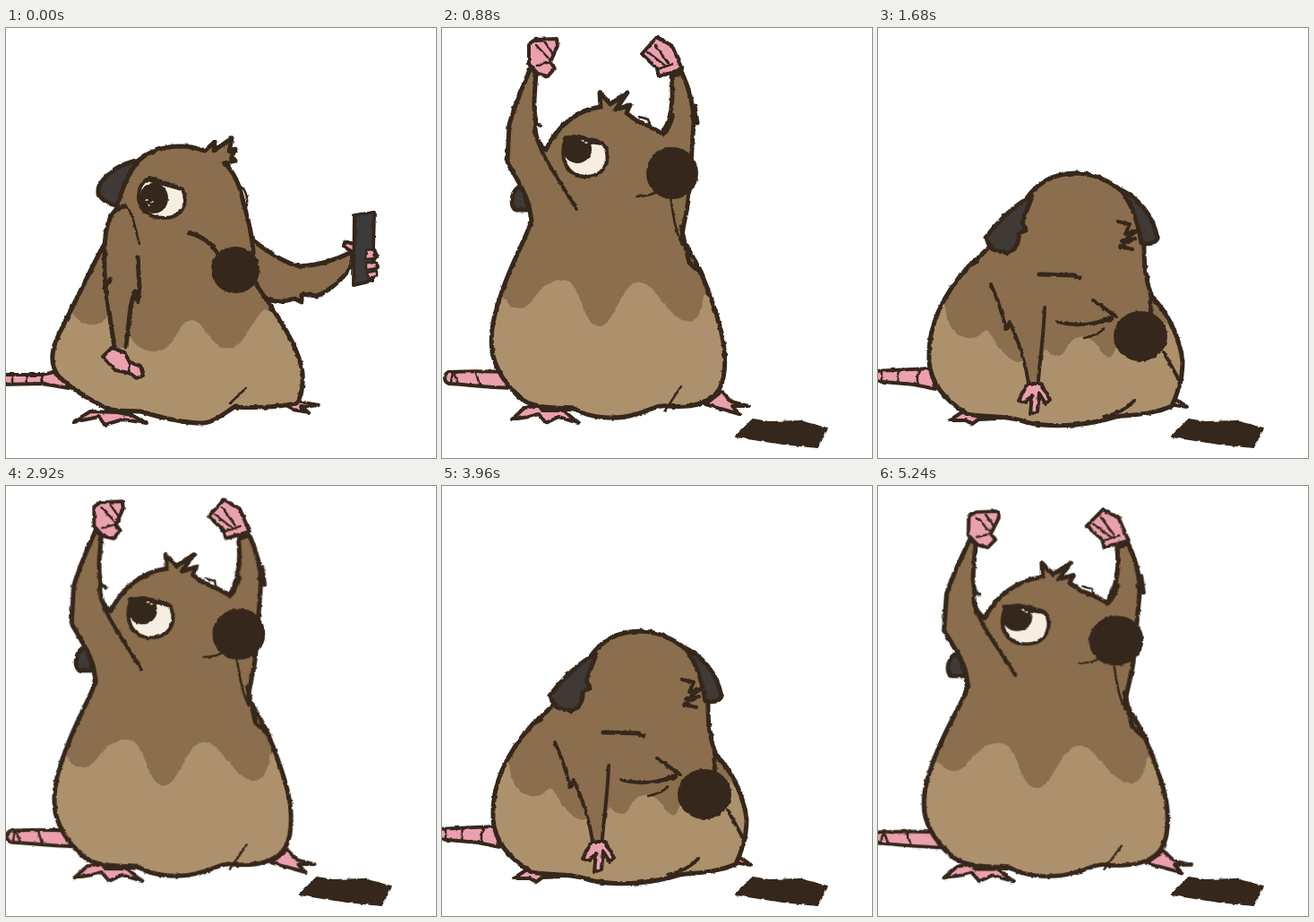
Animation, 480 px wide and 480 px high, one loop 5.28 s. Source, as an HTML page:

```html
<!DOCTYPE html>
<html lang="en">
<head>
<meta charset="utf-8">
<title>Grumpy rat</title>
<style>
@property --s { syntax: '<number>'; inherits: false; initial-value: 0; }
html, body { margin: 0; height: 100%; overflow: hidden; background: #fff; }
svg { display: block; width: 100vw; height: 100vh; }
path, ellipse { stroke-linecap: round; stroke-linejoin: round; }

.ink { fill: none; stroke: #35271b; stroke-width: 4; }
.edge { fill: none; stroke: #35271b; stroke-width: 5; }
.fur { fill: #8a6e4d; }
.belly { fill: #ad916d; }
.limb { fill: #8a6e4d; stroke: #35271b; stroke-width: 5; }
.pink { fill: #eba0b0; stroke: #35271b; stroke-width: 4; }
.ear { fill: #403a37; stroke: #35271b; stroke-width: 5; }
.white { fill: #f6eee1; stroke: #35271b; stroke-width: 4; }
.dark { fill: #35271b; stroke: #35271b; stroke-width: 2; }
.glass { fill: #3b3b3c; stroke: #35271b; stroke-width: 4; }
.thin { stroke-width: 2.5; }
.glint { fill: none; stroke: #f6eee1; stroke-width: 1.5; }
.fingerEdge { fill: none; stroke: #35271b; stroke-width: 14; }
.finger { fill: none; stroke: #eba0b0; stroke-width: 7; }

/* pose switching: one loop is 5280 ms */
.look, .rage, .slump, .shrug, .held, .dropped { animation: 5280ms step-end infinite; }
.look { animation-name: look; }
.rage { animation-name: rage; }
.slump { animation-name: slump; }
.shrug { animation-name: shrug; }
.held { animation-name: held; }
.dropped { animation-name: dropped; }
@keyframes look { 0% { visibility: visible } 16.66%, 100% { visibility: hidden } }
@keyframes rage {
  0%, 27.27%, 60.6% { visibility: hidden }
  16.66%, 55.3%, 93.93%, 100% { visibility: visible }
}
@keyframes slump {
  0%, 55.3%, 93.93%, 100% { visibility: hidden }
  27.27%, 70.45% { visibility: visible }
}
@keyframes shrug { 0%, 70.45%, 100% { visibility: hidden } 60.6% { visibility: visible } }
@keyframes held { 0% { visibility: inherit } 6.05%, 100% { visibility: hidden } }
@keyframes dropped { 0% { visibility: hidden } 6.05%, 100% { visibility: visible } }

/* motion inside a pose */
.sway { transform: matrix(1, 0, calc(-.05 * var(--s)), 1, calc(21 * var(--s)), 0); }
.look .sway { animation: throwLean 5280ms infinite ease-in-out; }
.shrug .sway { animation: shrugLean 5280ms infinite ease-in-out; }
@keyframes throwLean {
  0%, 1.51% { --s: 0 } 4.5% { --s: -.8 } 6.8% { --s: 1.4 } 9.1% { --s: .8 } 11.36%, 100% { --s: 1 }
}
@keyframes shrugLean {
  0%, 60.6% { --s: -.7 } 63% { --s: .3 } 65.9% { --s: 0 } 68% { --s: .4 } 70.45%, 100% { --s: .1 }
}
.throw { transform-origin: 285px 262px; animation: throw 5280ms infinite ease-in-out; }
@keyframes throw {
  0%, 1.51% { transform: rotate(0) }
  4.5% { transform: rotate(-72deg) }
  6.8% { transform: rotate(38deg) }
  9.1% { transform: rotate(22deg) }
  11.36%, 12.8% { transform: rotate(28deg) }
  12.87%, 100% { transform: rotate(32deg) }
}
.stretch {
  transform: matrix(calc(1 + .046 * var(--s)), 0, calc(-.019 * var(--s)), calc(1 - .037 * var(--s)),
    calc(.2 * var(--s)), calc(16.6 * var(--s)));
  animation: stretch 5280ms infinite ease-in-out;
}
@keyframes stretch {
  0%, 16.66% { --s: 0 } 18.2% { --s: -.2 } 22% { --s: 1 } 24.5% { --s: .6 } 26.5% { --s: .75 }
  55.3% { --s: .32 } 56.8% { --s: .05 } 60.6% { --s: 1 }
  93.93% { --s: .25 } 99.24%, 100% { --s: 1 }
}
.settle { transform-origin: 200px 440px; animation: settle 5280ms infinite ease-in-out; }
@keyframes settle {
  0%, 27.27%, 70.45% { transform: scale(.95, 1.14) }
  29.6%, 72.8% { transform: scale(1.025, .95) }
  31.8%, 55.3%, 75%, 100% { transform: none }
}
.fall { transform-origin: 380px 453px; animation: fall 5280ms infinite ease-in; }
@keyframes fall {
  0%, 6.05% { transform: translate(30px, -120px) rotate(-40deg) }
  7.57%, 100% { transform: none }
}
</style>
</head>
<body>
<svg viewBox="0 0 480 480">
<defs>
  <!-- rough pen edge -->
  <filter id="rough" filterUnits="userSpaceOnUse" x="0" y="0" width="480" height="480" color-interpolation-filters="sRGB">
    <feTurbulence type="fractalNoise" baseFrequency=".16" numOctaves="2" seed="4"/>
    <feDisplacementMap in="SourceGraphic" scale="3" xChannelSelector="R" yChannelSelector="G"/>
  </filter>

  <path id="sitBody" d="M148 148C160 137 178 132 195 132C206 132 214 134 222 137L233 127L232 137L252 123L249 138L256 135L252 144L256 148L244 151C254 160 261 175 265 195C271 215 275 232 276 250L278 284L291 304C308 328 328 360 331 385C332 402 330 412 324 419C300 424 275 424 255 423C242 431 232 441 218 441C195 441 170 434 150 428C135 427 122 428 114 425C95 416 72 402 58 388C47 372 52 355 62 336C72 316 92 275 106 248C118 230 119 215 124 199C130 178 137 161 148 148Z"/>
  <path id="rageBody" d="M99 44C92 62 82 82 75 108L73 150C81 165 92 180 97 198L100 215C94 235 77 262 65 300C56 325 53 348 57 366C63 388 77 405 90 415C105 425 130 424 148 425C165 436 195 438 217 431C232 427 241 420 252 422C275 424 295 420 306 408C318 395 317 365 313 345C308 320 298 295 290 275C282 258 274 245 268 235C268 220 275 205 276 180L281 105C281 85 276 68 268 50L256 54C259 80 256 102 246 118C238 113 230 108 218 104L206 95L210 86L194 91L207 72L188 85L176 72L177 88C150 92 128 110 116 136C110 131 105 126 104 112L105 104C101 88 104 70 105 50Z"/>
  <path id="slumpBody" d="M166 190C180 170 200 162 222 162C245 163 260 172 272 182C288 197 298 225 297 250C297 270 302 290 306 301C322 315 337 345 340 372C340 395 333 410 328 422C305 432 280 432 265 434C240 442 200 448 165 440C145 432 120 435 100 431C75 416 59 397 57 372C55 335 70 300 102 265C115 255 122 245 130 240C145 225 155 210 166 190Z"/>
  <clipPath id="sitClip"><use href="#sitBody"/></clipPath>
  <clipPath id="rageClip"><use href="#rageBody"/></clipPath>
  <clipPath id="slumpClip"><use href="#slumpBody"/></clipPath>

  <g id="sitBack">
    <path class="ear" d="M149 147C132 151 122 156 115 163C106 171 102 177 103 184C106 191 114 197 128 199C130 180 138 160 149 147Z"/>
    <path class="white thin" d="M259 176C269 178 272 196 266 204Z"/>
    <use class="fur" href="#sitBody"/>
  </g>
  <g id="sitFace">
    <use class="edge" href="#sitBody"/>
    <path class="white" d="M157 169L197 180C205 197 195 212 177 212C157 212 147 201 148 187C149 177 152 172 157 169Z"/>
    <ellipse class="dark" cx="165" cy="190" rx="15" ry="16"/>
    <path class="ink" d="M160 167L178 173L197 180"/>
    <path class="glint" d="M156 192h2m4 3h2m-5 3h1"/>
    <path class="edge" d="M205 229C220 233 232 242 236 252"/>
    <ellipse class="dark" cx="256" cy="270" rx="26" ry="25"/>
    <path class="ink thin" d="M268 402L250 419"/>
  </g>
  <g id="sitBase">
    <path class="pink" d="M-5 387L40 387L68 381L70 402L40 397L-5 398Z"/>
    <path class="ink thin" d="M7 387v11M24 387q-3 6 0 11M43 387q-6 5-2 11"/>
    <path class="pink" d="M308 417L326 417L349 421L329 423L338 429L320 426Z"/>
  </g>
  <path id="sitFoot" class="pink" d="M75 440L94 428L124 429L140 432L157 441L130 437L110 443L104 434Z"/>
  <path id="leftFingers" d="M93 270C86 272 79 270 76 266M98 269L87 248M106 269Q102 255 106 244M121 266C115 256 124 245 128 252Q131 264 121 266"/>
  <path id="rightFingers" d="M395 255C395 244 402 239 402 229M398 254C406 240 413 242 421 238Q430 234 438 234M398 258C410 258 416 264 428 260Q437 255 438 240"/>
</defs>

<g filter="url(#rough)">
<g class="dropped"><path class="dark fall" d="M328 456L347 437L365 440L399 439L430 447L419 468L380 464Z"/></g>

<g class="look">
  <use href="#sitBase"/>
  <use href="#sitFoot"/>
  <g class="sway">
    <g class="throw">
      <path class="limb" d="M272 234C292 250 312 263 328 266C350 265 370 258 386 250L387 264C374 284 355 297 346 299L330 297L330 306L322 302C310 306 298 306 290 302L266 275Z"/>
      <path class="pink" d="M390 252L377 244Q377 237 384 240L410 246L414 254L410 260L415 267L409 270L411 278L392 276Z"/>
      <g class="held">
        <path class="glass" d="M389 209L411 206L409 282L388 287Z"/>
        <path class="pink thin" d="M402 248L411 247L412 257L401 258ZM402 262L414 262L414 268L402 270ZM403 273L414 271L414 277L404 279Z"/>
      </g>
    </g>
    <use href="#sitBack"/>
    <path class="belly" clip-path="url(#sitClip)" d="M70 312C82 335 104 338 116 318C122 308 130 326 136 340C143 354 152 361 166 361C190 361 192 326 207 326C222 326 228 358 248 358C268 358 275 318 291 314L310 324L400 460H0Z"/>
    <use href="#sitFace"/>
    <path class="fur" d="M133 199C118 200 110 218 110 250C109 280 113 310 121 357H134L139 309L148 300V245C146 220 142 203 133 199Z"/>
    <path class="edge" d="M133 199C118 200 110 218 110 250C109 275 110 290 114 310L121 356M147 256L149 290L147 305L144 294L139 311L134 356M116 281L110 290"/>
    <path class="ink thin" d="M133 199C142 204 144 225 149 241"/>
    <path class="pink" d="M108 367L118 357L132 362L138 373L150 377L153 388L146 391L137 385L122 382Z"/>
    <path class="ink thin" d="M138 373L137 385"/>
  </g>
</g>

<g class="shrug">
  <use href="#sitBase"/>
  <use href="#sitFoot" x="-6" y="-1"/>
  <g class="sway">
    <path class="limb" d="M285 231C310 250 330 264 345 266C365 264 385 256 397 248L393 274C382 288 365 296 350 297L343 297L343 306L337 302C323 306 311 303 304 300L282 275Z"/>
    <use class="fingerEdge" href="#rightFingers"/>
    <use class="finger" href="#rightFingers"/>
    <g transform="matrix(1.03 0 -.052 1 19 0)">
      <use href="#sitBack"/>
      <path class="belly" clip-path="url(#sitClip)" d="M60 316L73 324C76 338 83 346 93 346C117 346 122 317 145 317C161 317 165 346 181 346C203 346 207 317 226 317C240 317 246 346 260 346C278 346 284 326 299 315L400 460H0Z"/>
      <use href="#sitFace"/>
    </g>
    <path class="fur" d="M90 276C92 292 105 304 128 306L141 293L137 277L122 268Z"/>
    <path class="ink" d="M88 276C92 292 105 303 128 306C136 305 140 299 141 293M122 271L137 278"/>
    <use class="fingerEdge" href="#leftFingers"/>
    <use class="finger" href="#leftFingers"/>
  </g>
</g>

<g class="rage"><g class="stretch">
  <path class="pink" d="M8 384C30 383 50 383 72 384L78 402C50 401 25 398 8 397C1 395 2 385 8 384Z"/>
  <path class="ink thin" d="M12 385l-2 11M14 387l4 10M38 385l4 14"/>
  <path class="ear" d="M85 178C76 185 76 203 84 203L97 203L91 180Z"/>
  <path class="pink" d="M78 437L92 424L108 421L112 427L136 427L152 441L130 434L116 441L108 431L97 434ZM294 420L312 406L323 417L342 422L324 422L332 431Z"/>
  <use class="fur" href="#rageBody"/>
  <path class="belly" clip-path="url(#rageClip)" d="M60 285C75 320 92 318 102 302C115 284 130 277 142 283C157 295 158 333 176 333C192 333 200 284 219 284C238 284 245 313 268 326C282 331 290 322 292 298L340 290V460H40Z"/>
  <use class="edge" href="#rageBody"/>
  <path class="ink" d="M104 118C112 146 134 174 150 202M104 104L110 109"/>
  <path class="edge" d="M257 98Q255 110 247 119M282 87L285 106L279 99M267 222L276 262L291 276"/>
  <path class="ink thin" d="M255 188C258 212 262 230 268 242M220 99L230 102L233 111L222 107M267 400L249 427"/>
  <path class="white" d="M138 124L180 129C190 143 184 166 160 166C140 166 130 146 138 124Z"/>
  <ellipse class="dark" cx="151" cy="135" rx="15" ry="15"/>
  <path class="edge" d="M137 123Q158 120 179 129"/>
  <path class="glint" d="M156 126h2m2 2h2"/>
  <path class="ink thin" d="M218 188C228 188 238 185 243 180"/>
  <ellipse class="dark" cx="257" cy="162" rx="28" ry="28"/>
  <path class="pink" d="M97 40L97 18L104 13L128 12L129 20L121 38L126 45L118 54L107 51Z"/>
  <path class="ink thin" d="M105 19L121 36M115 16L124 29M106 42L121 38"/>
  <path class="pink" d="M223 29L240 10L257 20L268 46L255 50L242 54L240 45Z"/>
  <path class="ink thin" d="M230 27L249 42M238 19L252 39M241 46L258 40"/>
</g></g>

<g class="slump"><g class="settle">
  <path class="pink" d="M-5 383L60 380L64 403L40 398L-5 394Z"/>
  <path class="ink thin" d="M4 383v11M24 382q-4 7-1 14M47 381q-5 8-2 17"/>
  <path class="pink" d="M80 438L95 428L135 436L112 437L105 442L98 438ZM324 420L334 415L345 423Z"/>
  <use class="fur" href="#slumpBody"/>
  <path class="belly" clip-path="url(#slumpClip)" d="M76 290C68 345 105 358 121 336C134 352 143 374 160 373H180L187 358C200 372 207 366 212 354C224 338 240 344 250 362C259 373 264 368 268 345L300 320L323 331L350 338V460H40V290Z"/>
  <use class="edge" href="#slumpBody"/>
  <path class="fur" d="M126 286L142 330L147 327C157 350 164 370 168 396H179C181 370 185 345 186 312Z"/>
  <path class="ink" d="M126 286Q136 308 143 336L147 328C157 350 164 370 168 396M186 312C185 345 180 375 179 394"/>
  <path class="ear" d="M172 188C155 195 135 215 121 233C122 245 132 250 145 251C154 246 158 238 157 229L165 226L161 217ZM272 181C290 190 307 208 312 235C308 242 300 241 294 240C290 215 282 195 272 181Z"/>
  <path class="ink" d="M268 216L281 219L276 230L290 226L272 238L287 235L270 244L284 247"/>
  <path class="edge" d="M180 275L219 276L225 279"/>
  <path class="ink" d="M240 304L266 322M201 328C225 335 245 330 262 322M297 265L304 297L305 320M319 362L335 391"/>
  <path class="ink thin" d="M230 346Q245 343 252 336M240 331L262 325"/>
  <ellipse class="dark" cx="293" cy="344" rx="29" ry="27"/>
  <path class="ink" d="M286 416C275 428 262 432 252 434"/>
  <path class="ink" d="M101 266L111 261"/>
  <path class="pink" d="M167 397L182 397L192 415L187 419L180 408L178 428L170 431L172 410L164 418L157 416Z"/>
</g></g>
</g>
</svg>
</body>
</html>
```
